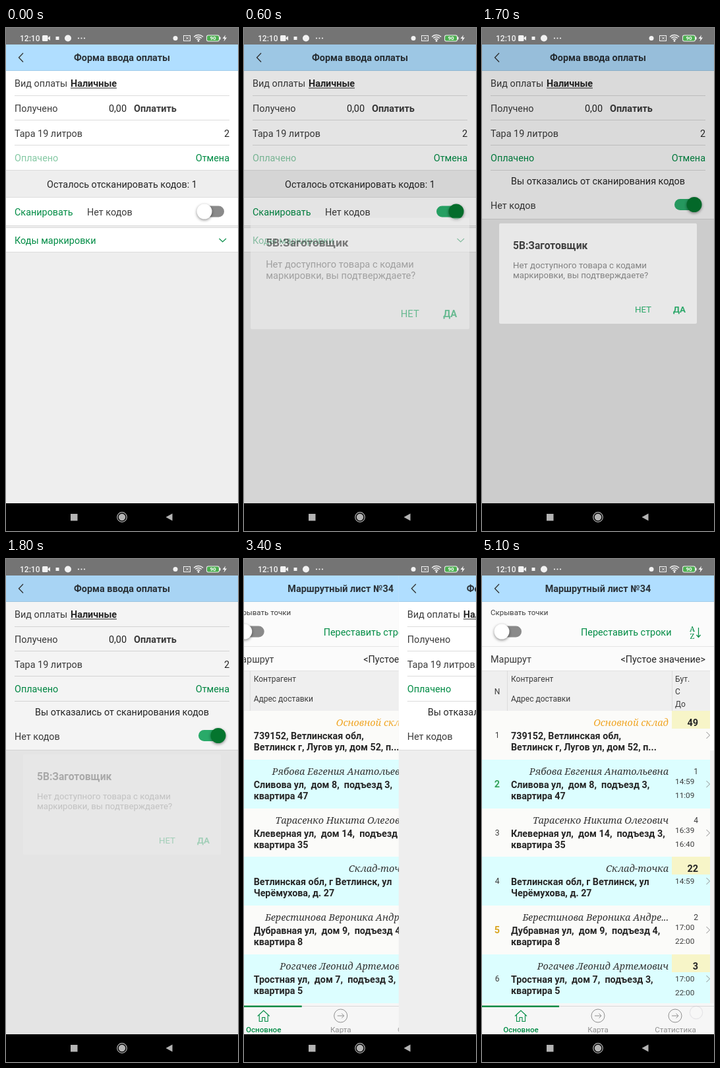
These frames come from a looping animation (352 px wide and 762 px high, 5.8 s). An HTML page with a canvas:

```html
<!DOCTYPE html>
<html lang="ru">
<head>
<meta charset="utf-8">
<title>Форма ввода оплаты</title>
<style>
html, body { margin: 0; width: 100%; height: 100%; overflow: hidden; background: #eee; }
canvas { display: block; width: 352px; height: 762px; }
</style>
</head>
<body>
<canvas id="stage"></canvas>
<script>
const W = 352, H = 762, LOOP = 5800, STEP = 100;
const GREEN = '#008c45', INK = '#3c3c3c', DARK = '#262626', PAGE = '#eeeeee', LINE = '#dcdcdc';
const SANS = 'Roboto, sans-serif', SERIF = '"Noto Serif", serif';

const canvas = document.getElementById('stage');
const ctx = canvas.getContext('2d');
const ratio = window.devicePixelRatio || 1;
canvas.width = W * ratio;
canvas.height = H * ratio;

// Piecewise linear value at time t
function track(t, keys) {
  if (t <= keys[0][0]) return keys[0][1];
  for (let i = 1; i < keys.length; i++) {
    const [t0, v0] = keys[i - 1], [t1, v1] = keys[i];
    if (t <= t1) return v0 + (v1 - v0) * (t - t0) / (t1 - t0);
  }
  return keys[keys.length - 1][1];
}

function rect(x, y, w, h, color) {
  ctx.fillStyle = color;
  ctx.fillRect(x, y, w, h);
}

// y is the middle of the capitals
function text(s, x, y, { size = 14.4, color = INK, weight = 400, align = 'left', style = 'normal', family = SANS } = {}) {
  ctx.font = `${style} ${weight} ${size}px ${family}`;
  ctx.fillStyle = color;
  ctx.textAlign = align;
  ctx.fillText(s, x, y + size * 0.355);
}

function path(points, color, width = 1, close = false) {
  ctx.beginPath();
  points.forEach(([x, y]) => ctx.lineTo(x, y));
  if (close) ctx.closePath();
  ctx.strokeStyle = color;
  ctx.lineWidth = width;
  ctx.stroke();
}

function shape(points, color) {
  ctx.beginPath();
  points.forEach(([x, y]) => ctx.lineTo(x, y));
  ctx.fillStyle = color;
  ctx.fill();
}

function disc(x, y, r, color) {
  ctx.beginPath();
  ctx.arc(x, y, r, 0, Math.PI * 2);
  ctx.fillStyle = color;
  ctx.fill();
}

function ring(x, y, r, color, width = 1) {
  ctx.beginPath();
  ctx.arc(x, y, r, 0, Math.PI * 2);
  ctx.strokeStyle = color;
  ctx.lineWidth = width;
  ctx.stroke();
}

function pill(x, y, w, h, r, color) {
  ctx.beginPath();
  ctx.roundRect(x, y, w, h, r);
  ctx.fillStyle = color;
  ctx.fill();
}

function mix(a, b, k) {
  return `rgb(${a.map((v, i) => Math.round(v + (b[i] - v) * k))})`;
}

// x is the thumb centre in the off position
function toggle(x, y, k) {
  pill(x - 9 + 8 * (1 - k), y - 8.5, 31, 17, 8.5, mix([138, 138, 138], [43, 178, 110], k));
  ctx.save();
  ctx.shadowColor = 'rgba(0,0,0,.45)';
  ctx.shadowBlur = 4 * ratio;
  ctx.shadowOffsetY = 1.5 * ratio;
  disc(x + 21 * k, y, 11.5, mix([255, 255, 255], [4, 122, 48], k));
  ctx.restore();
}

function statusBar() {
  const white = '#f2f2f2';
  rect(0, 0, W, 25, '#747474');
  text('12:10', 21, 15.5, { size: 12, color: white, weight: 500 });
  pill(55, 11, 8.5, 9, 1.5, white);
  shape([[63, 15.5], [67, 12], [67, 19]], white);
  rect(75.5, 13, 5, 5, white);
  disc(94, 15.5, 5, white);
  [110, 114.5, 119].forEach(x => disc(x, 15.5, 1.1, white));

  disc(257, 15.5, 3.5, white);
  ctx.strokeStyle = white;
  ctx.lineWidth = 1;
  ctx.strokeRect(269.5, 11.5, 10, 8);
  path([[273, 13.5], [277, 17.5]], white);
  path([[277, 13.5], [273, 17.5]], white);
  for (const r of [9.5, 6.5, 3.5]) {
    ctx.beginPath();
    ctx.arc(292, 20, r, -Math.PI * 0.76, -Math.PI * 0.24);
    ctx.lineWidth = 1.5;
    ctx.stroke();
  }
  disc(292, 19.5, 1.4, white);
  pill(304, 10.5, 20, 10, 3, white);
  pill(305, 11.5, 18, 8, 2, '#4cae50');
  text('90', 314, 15.5, { size: 8, color: '#fff', weight: 700, align: 'center' });
  rect(324, 13.5, 1.5, 4, white);
  shape([[333, 10.5], [328.5, 16], [331.5, 16], [330.5, 20.5], [335, 14.5], [332, 14.5]], white);
}

function navBar() {
  const gray = '#b4b4b4';
  rect(0, 720, W, 42, '#000');
  rect(98, 736, 10.5, 10.5, gray);
  ring(176, 741, 7.3, gray, 1.2);
  disc(176, 741, 5.2, gray);
  shape([[242.5, 741], [252.5, 735.5], [252.5, 746.5]], gray);
}

function header(title) {
  rect(0, 25, W, 40, '#b0deff');
  rect(0, 64, W, 1, '#a3cdea');
  path([[26, 38], [19.5, 44.7], [26, 51.5]], '#333', 1.3);
  text(title, 176, 45, { weight: 700, color: '#2b3238', align: 'center' });
}

function rule(y) {
  rect(13, y, 326, 1, LINE);
}

function form(t) {
  const done = t >= 1700;
  rect(0, 25, W, 695, PAGE);
  rect(0, 65, W, 150, '#fff');
  header('Форма ввода оплаты');
  text('Вид оплаты', 13, 84);
  text('Наличные', 98, 84, { weight: 700, color: DARK });
  rect(98, 90.5, 70, 1, DARK);
  rule(102);
  text('Получено', 13, 122);
  text('0,00', 183, 122, { align: 'right', color: DARK });
  text('Оплатить', 194, 122, { weight: 700 });
  rule(139);
  text('Тара 19 литров', 13, 160);
  text('2', 339, 160, { align: 'right', color: DARK });
  rule(177);
  text('Оплачено', 13, 197, { color: done ? GREEN : '#85c9a4' });
  text('Отмена', 339, 197, { color: GREEN, align: 'right' });

  if (done) {
    rect(0, 215, W, 75, '#fff');
    rule(215);
    text('Вы отказались от сканирования кодов', 176, 232, { align: 'center', color: DARK });
    text('Нет кодов', 13, 269);
    toggle(301, 267.5, 1);
    rect(0, 289, W, 1, LINE);
    return;
  }
  rect(0, 215, W, 1, LINE);
  text('Осталось отсканировать кодов: 1', 176, 237, { align: 'center', color: DARK });
  rect(0, 256, W, 1, LINE);
  rect(0, 257, W, 43, '#fff');
  text('Сканировать', 13, 279, { color: GREEN });
  text('Нет кодов', 123, 279);
  toggle(301, 278, track(t, [[300, 0], [500, 1]]));
  rect(0, 299, W, 1, LINE);
  rect(0, 303, W, 36, '#fff');
  rect(0, 302, W, 1, LINE);
  text('Коды маркировки', 13, 322, { color: GREEN });
  path([[323.5, 319], [328.7, 324], [334, 319]], GREEN, 1.1);
  rect(0, 339, W, 1, LINE);
}

function dialog(t) {
  const dim = track(t, [[400, 0], [600, .105], [800, .185], [1600, .185], [1700, .147], [1800, .042], [2000, 0]]);
  const alpha = track(t, [[400, 0], [500, .12], [600, .55], [700, .9], [800, 1], [1600, 1], [1700, .82], [1800, .3], [1900, .06], [2000, 0]]);
  const scale = track(t, [[500, 1.19], [600, 1.107], [700, 1.03], [800, 1]]);
  if (!alpha) return;
  rect(0, 25, W, 695, `rgba(0,0,0,${dim})`);
  ctx.save();
  ctx.globalAlpha = alpha;
  ctx.translate(176, 372);
  ctx.scale(scale, scale);
  ctx.translate(-176, -372);
  pill(26, 296, 300, 152, 2, '#eeeeee');
  text('5В:Заготовщик', 47, 329, { size: 15.6, weight: 700, color: '#1c1c1c' });
  const body = { size: 13.2, color: '#6a6a6a' };
  text('Нет доступного товара с кодами', 47, 359, body);
  text('маркировки, вы подтверждаете?', 47, 374.5, body);
  text('НЕТ', 257, 426.5, { size: 13.3, color: '#00984c', align: 'right' });
  text('ДА', 309, 426.5, { size: 13.3, color: '#00984c', weight: 700, align: 'right' });
  ctx.restore();
}

const stops = [
  { name: 'Основной склад', nameColor: '#f0a524', lines: ['739152, Ветлинская обл,', 'Ветлинск г, Лугов ул, дом 52, п...'], count: 49, big: true, times: [] },
  { name: 'Рябова Евгения Анатольевна', lines: ['Сливова ул,  дом 8,  подъезд 3,', 'квартира 47'], count: 1, times: ['14:59', '11:09'], mark: '#35a35c' },
  { name: 'Тарасенко Никита Олегович', lines: ['Клеверная ул,  дом 14,  подъезд 3,', 'квартира 35'], count: 4, times: ['16:39', '16:40'] },
  { name: 'Склад-точка', lines: ['Ветлинская обл, г Ветлинск, ул', 'Черёмухова, д. 27'], count: 22, big: true, times: ['14:59'] },
  { name: 'Берестинова Вероника Андре...', lines: ['Дубравная ул,  дом 9,  подъезд 4,', 'квартира 8'], count: 2, times: ['17:00', '22:00'], mark: '#d9a520' },
  { name: 'Рогачев Леонид Артемович', lines: ['Тростная ул,  дом 7,  подъезд 3,', 'квартира 5'], count: 3, big: true, times: ['17:00', '22:00'] }
];

function stopRow(stop, i) {
  const y = 230 + Math.round(i * 73.8);
  rect(0, y, 346, 74, i % 2 ? '#dcfeff' : '#fbfbf9');
  if (stop.big) rect(288, y, 58, 27, '#f7f5c8');
  text(i + 1, 23, y + 37, stop.mark
    ? { weight: 700, color: stop.mark, align: 'center' }
    : { size: 12, align: 'center' });
  text(stop.name, 283, y + 17.5, { style: 'italic', family: SERIF, align: 'right', color: stop.nameColor || '#333' });
  stop.lines.forEach((s, n) => text(s, 44, y + 37.5 + n * 17, { size: 14.3, weight: 700, color: DARK }));
  text(stop.count, 328, y + 17.5, stop.big
    ? { weight: 700, color: DARK, align: 'right' }
    : { size: 12, align: 'right' });
  stop.times.forEach((s, n) => text(s, 293, y + (stop.big ? 37 : 33) + n * 20.5, { size: 11.8 }));
  path([[340.5, y + 32], [345.5, y + 37], [340.5, y + 42]], '#8c8c8c', 1);
}

function tabs() {
  const gray = '#8f8f8f';
  rect(0, 673, W, 47, '#f6f6f6');
  rect(0, 677, W, 1, '#d8d8d8');
  rect(0, 676.5, 117, 2.5, GREEN);
  path([[50, 692.5], [59, 684], [68, 692.5]], GREEN, 1.1);
  path([[52.5, 691], [52.5, 700.5], [57, 700.5], [57, 694.5], [61, 694.5], [61, 700.5], [65.5, 700.5], [65.5, 691]], GREEN, 1.1);
  for (const x of [176, 293]) {
    ring(x, 692, 10, gray);
    path([[x - 5, 692], [x + 5, 692]], gray);
    path([[x + 1.5, 688.5], [x + 5, 692], [x + 1.5, 695.5]], gray);
  }
  const label = { size: 11.6, align: 'center' };
  text('Основное', 59, 713, { ...label, color: GREEN, weight: 500 });
  text('Карта', 176, 713, { ...label, color: gray });
  text('Статистика', 293.5, 713, { ...label, color: gray });
}

function route() {
  rect(0, 25, W, 695, '#fbfbfb');
  header('Маршрутный лист №34');
  text('Скрывать точки', 13, 81, { size: 11.5 });
  toggle(30, 110, 0);
  text('Переставить строки', 150, 111, { color: GREEN });
  const letter = { size: 11.5, color: GREEN, family: SERIF, align: 'center' };
  text('A', 319, 105.5, letter);
  text('Z', 319, 116.5, letter);
  path([[328.5, 104], [328.5, 118]], GREEN, 1.2);
  path([[325.5, 115], [328.5, 118.5], [331.5, 115]], GREEN, 1.2);
  rect(0, 132, W, 1, '#e4e4e4');
  text('Маршрут', 13, 152);
  text('<Пустое значение>', 339, 152, { align: 'right', color: DARK });

  rect(0, 169, 346, 61, '#efefef');
  rect(0, 169, 346, 1, '#e2e2e2');
  rect(38, 169, 1, 61, LINE);
  rect(288, 169, 1, 61, LINE);
  const head = { size: 12 };
  text('N', 23, 201, { size: 12, align: 'center' });
  text('Контрагент', 44, 182, head);
  text('Адрес доставки', 44, 212, head);
  text('Бут.', 293, 182, head);
  text('С', 293, 201, head);
  text('До', 293, 219.5, head);

  rect(346, 169, 6, 121, '#fdfdfd');
  rect(346, 290, 6, 383, '#f0f0f0');
  stops.forEach(stopRow);
  tabs();
}

const touches = [
  { x: 302, y: 280, keys: [[200, 0], [300, 1], [400, 1], [500, 0]] },
  { x: 300, y: 428, keys: [[1400, 0], [1500, 1], [1600, 1], [1700, 0]] },
  { x: 60.5, y: 206, keys: [[2800, 0], [2900, 1], [3000, 1], [3100, 0]] },
  { x: 325, y: 687, keys: [[4800, 0], [4900, 1], [5000, 1], [5100, .3]] }
];

function touch({ x, y, keys }, t) {
  const alpha = track(t, keys);
  if (!alpha) return;
  ctx.globalAlpha = alpha;
  disc(x, y, 10, 'rgba(255,255,255,.6)');
  ring(x, y, 9.7, 'rgba(135,130,145,.5)', 1.2);
  ctx.globalAlpha = 1;
}

function draw(t) {
  ctx.setTransform(ratio, 0, 0, ratio, 0, 0);
  const rest = t >= 3700 ? 0 : t <= 3326 ? W : W * Math.exp((3326 - t) / 67.3);
  if (rest < W) {
    ctx.save();
    ctx.translate(-rest / 4, 0);
    route();
    ctx.restore();
  }
  if (rest > 0) {
    ctx.save();
    ctx.translate(W - rest, 0);
    form(t);
    ctx.restore();
  }
  dialog(t);
  statusBar();
  navBar();
  touches.forEach(p => touch(p, t));
}

const start = performance.now();
function tick() {
  const t = (performance.now() - start) % LOOP;
  draw(Math.floor(t / STEP) * STEP);
  requestAnimationFrame(tick);
}
tick();
</script>
</body>
</html>
```
